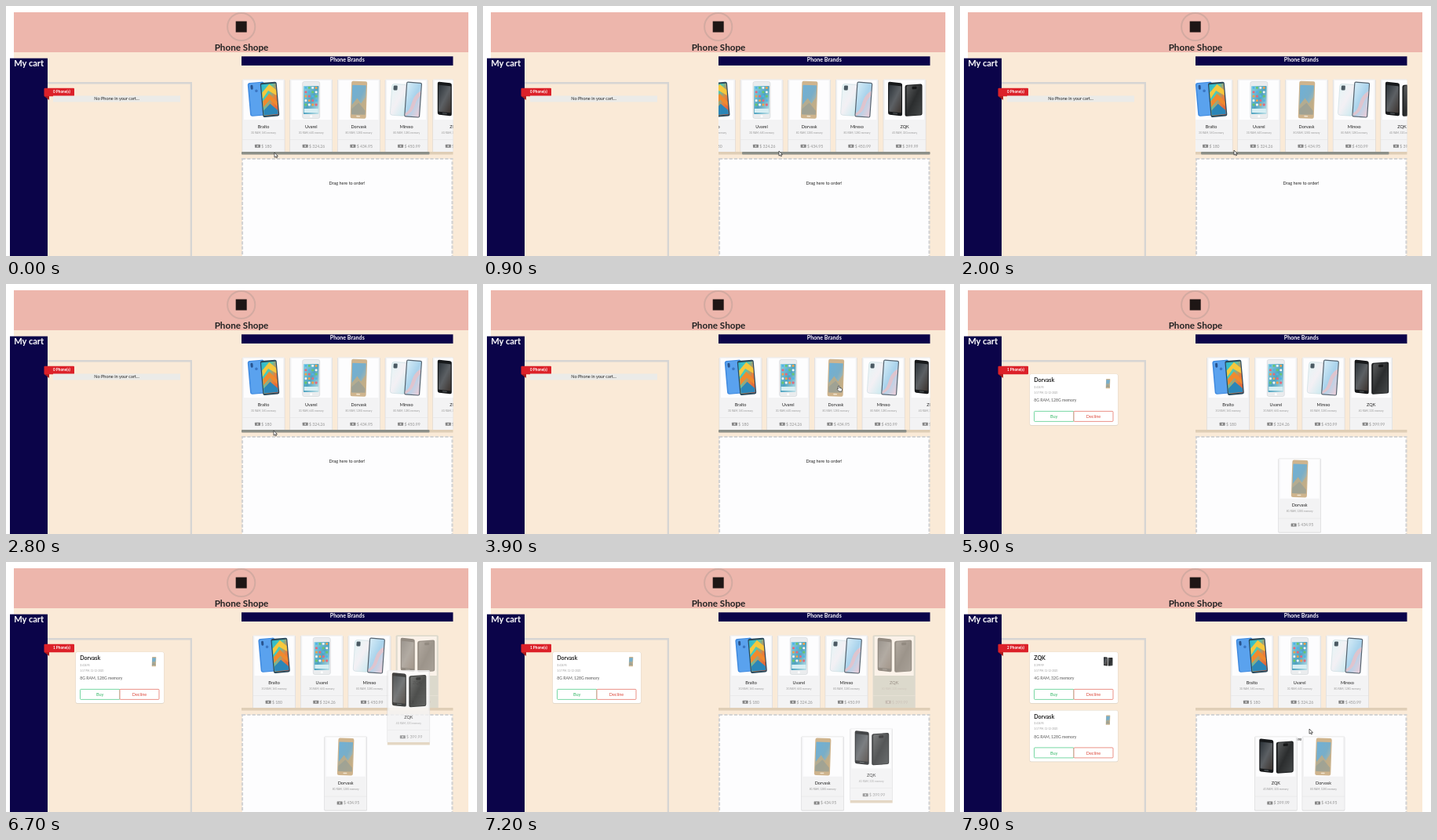
Write an HTML page that moves like this. It is 600 px wide and 319 px high and loops after 8 s.

```html
<!DOCTYPE html>
<html lang="en">
<head>
<meta charset="utf-8">
<title>Phone Shope</title>
<style>
html, body { margin: 0; width: 100%; height: 100%; overflow: hidden; background: #fff; }
svg { display: block; width: 600px; height: 319px; font-family: Lato, "Open Sans", sans-serif; }
.b { font-weight: 700; }
.m { text-anchor: middle; }
</style>
</head>
<body>
<svg id="stage" viewBox="0 0 600 319"></svg>
<script>
const STEP = 60.7, LOOP = 8000;
const phones = [
  { name: 'Bralto', spec: '3G RAM, 16G memory', price: '180' },
  { name: 'Uvarel', spec: '3G RAM, 64G memory', price: '324.26' },
  { name: 'Dorvask', spec: '8G RAM, 128G memory', price: '434.95' },
  { name: 'Mirexo', spec: '8G RAM, 128G memory', price: '450.99' },
  { name: 'ZQK', spec: '4G RAM, 32G memory', price: '399.99' }
];
// Pointer path: time, x, y
const path = [
  [0, 342, 187], [100, 343, 187], [800, 377, 185], [1200, 377, 185], [2000, 349, 184],
  [2300, 341, 186], [2800, 341, 187], [3700, 452, 130], [4000, 452, 130], [4900, 436, 262],
  [5200, 436, 262], [5900, 525, 122], [6400, 525, 122], [7200, 496, 240.5], [7400, 494, 246],
  [7900, 445, 213]
];
const drags = [{ id: 2, from: 4000, to: 4900 }, { id: 4, from: 6400, to: 7400 }];

const rect = (x, y, w, h, fill, more = '') =>
  `<rect x="${x}" y="${y}" width="${w}" height="${h}" fill="${fill}" ${more}/>`;
const text = (x, y, size, fill, str, cls = '') =>
  `<text x="${x}" y="${y}" font-size="${size}" fill="${fill}" class="${cls}">${str}</text>`;
const at = (x, y, body, more = '') => `<g transform="translate(${x} ${y})" ${more}>${body}</g>`;
const dot = (x, y, r, fill) => `<circle cx="${x}" cy="${y}" r="${r}" fill="${fill}"/>`;
const gradient = (id, colors) => `<linearGradient id="${id}" x2="1" y2="1">${
  colors.map((c, i) => `<stop offset="${i / (colors.length - 1)}" stop-color="${c}"/>`).join('')}</linearGradient>`;
const handset = (x, y, w, h, body, screen, edge = 3) =>
  rect(x, y, w, h, body, 'rx="2.2"') +
  rect(x + 1.2, y + edge, w - 2.4, h - 2 * edge, screen, 'rx=".7"');

const icons = () => {
  const colors = ['#4fb3e8', '#f0a04b', '#68c56c', '#e2677c', '#f4f4f4'];
  let out = '';
  for (let i = 0; i < 20; i++)
    out += rect(18.8 + i % 4 * 4.4, 9.5 + (i >> 2) * 5.4, 2.8, 2.8, colors[i * 7 % 5], 'rx=".7"');
  return out;
};
const art = [
  `<g transform="rotate(-5 27 26)">${rect(8.5, 3, 21, 43, '#3f8ae0', 'rx="3"')}
   ${rect(10, 4, 18, 41, '#5aa2ee', 'rx="2"')}${rect(12, 6, 3, 6, '#28548f', 'rx="1.5"')}
   ${dot(19, 14, 1.8, '#3b76c2')}${handset(24.5, 4.5, 21, 44, '#2b4a5c', 'url(#vivid)', 2)}
   <path d="M26 17L36 7L44 15V22L34 15L26 25Z" fill="#f6c83d"/>
   <path d="M26 28L35 19L44 30V36L35 27L26 36Z" fill="#f08a2e"/>
   <path d="M26 40L35 32L44 41V46H26Z" fill="#2b86b8"/></g>`,
  handset(16, 3, 22, 47, '#eaecee', 'url(#sea)', 5.5) + icons() +
    rect(18, 37.5, 18, 5, '#d6eef3') + dot(27, 47.2, 1.5, '#fff') +
    rect(16, 3, 22, 47, 'none', 'rx="2.2" stroke="#c9cdd1" stroke-width=".5"'),
  `<g transform="rotate(2 27 26)">${handset(17, 2.5, 20, 47.5, '#cfb48d', 'url(#sky)', 5)}
   <path d="M18.2 33L25 24L30 31L35.8 22V45H18.2Z" fill="#c9ab7c" opacity=".75"/>
   <path d="M18.2 38L27 30L35.8 40V45H18.2Z" fill="#8f9c9a" opacity=".6"/>
   ${rect(24.5, 46.4, 5, 1.6, '#f0e3cd', 'rx=".8"')}</g>`,
  `<g transform="rotate(4 27 26)">${rect(7.5, 7, 19, 40, 'url(#pearl)', 'rx="3" stroke="#bfd3d9" stroke-width=".5"')}
   ${rect(9.5, 9, 5, 6, '#4b5a63', 'rx="1.2"')}${handset(25.5, 3, 20, 45, '#55626e', 'url(#bloom)', 1.2)}
   <path d="M26.7 43C37 38 30 23 44.3 14V20C36 28 41 38 28 46.5H26.7Z" fill="#f1bfc4" opacity=".7"/></g>`,
  `<g transform="translate(6 3) skewY(6)">${handset(0, 0, 18, 42, '#17191b', 'url(#dusk)', 4)}
   ${rect(6, 39, 6, 1.4, '#4d5255', 'rx=".7"')}</g>
   <g transform="translate(27.5 7.5) skewY(-4)">${rect(0, 0, 22, 40, '#1d1f20', 'rx="2.2"')}
   ${rect(2, 1, 19, 38, 'url(#steel)', 'rx="1.8"')}${rect(9, 2.5, 6, 3.5, '#161718', 'rx="1"')}</g>`
];

function card(id, tone = '#f3f3f4') {
  const p = phones[id];
  return rect(-.3, .3, 54.6, 95, '#d4d4d5', 'rx="1.5"') +
    rect(.2, 0, 53.6, 94.4, tone, 'rx="1.2"') + rect(2, 1.5, 50, 50, '#fdfdfe') +
    `<use href="#p${id}"/>` +
    text(27, 62, 5.5, '#222', p.name, 'm') + text(27, 69, 3.2, '#999', p.spec, 'm') +
    rect(.2, 76.5, 53.6, .5, '#e0e0e1') +
    rect(16, 83.2, 7, 4, '#858585', 'rx=".5"') + dot(19.5, 85.2, 1, '#e4e4e5') +
    text(24.3, 87.1, 5.1, '#929292', '$ ' + p.price);
}

function cartItem(id, y) {
  const p = phones[id];
  return at(89, y,
    rect(-.4, -.2, 112.8, 66, '#dcd3c6', 'rx="2"') + rect(0, 0, 112, 65, '#fff', 'rx="1.8"') +
    at(92.5, 5.3, `<g transform="scale(.26)"><use href="#p${id}"/></g>`) +
    text(5.3, 10, 7, '#222', p.name, 'b') + text(5.5, 17.5, 3.1, '#999', '$ ' + p.price) +
    text(5.5, 24.5, 3.1, '#999', '3:17 PM, 12-12-2020') + text(5.3, 35, 5.1, '#555', p.spec) +
    rect(5.5, 47.4, 50.5, 13, '#fff', 'stroke="#3fc67d" stroke-width=".7" rx="1"') +
    rect(56, 47.4, 50, 13, '#fff', 'stroke="#e26355" stroke-width=".7" rx="1"') +
    text(30.7, 56, 5.6, '#35b768', 'Buy', 'm') + text(81, 56, 5.6, '#dd4b3e', 'Decline', 'm'));
}

const slot = (i, n) => Math.max(301, 436 - n * STEP / 2) + i * STEP;

function pointer(t) {
  const i = Math.max(1, path.findIndex(k => k[0] >= t));
  const [a, b] = [path[i - 1], path[i]];
  const f = (t - a[0]) / (b[0] - a[0]);
  return [a[1] + (b[1] - a[1]) * f, a[2] + (b[2] - a[2]) * f];
}

const arrow = '<path d="M0 0V6.2L1.5 5L2.5 7L3.5 6.5L2.6 4.6H4.4Z" fill="#fff" stroke="#222" stroke-width=".7"/>';
const hand = '<path d="M1 0Q2 0 2 1V2.5L5 3.2Q5.8 3.5 5.5 5L5 7H1.5L-1 4.2Q-.5 3.3 .3 4V1Q.3 0 1 0Z" fill="#fff" stroke="#222" stroke-width=".6"/>';

function scene(t) {
  const [cx, cy] = pointer(t);
  const ordered = drags.filter(d => t >= d.to).map(d => d.id).reverse();
  const list = phones.map((_, i) => i).filter(i => !ordered.includes(i));
  const drag = drags.find(d => t > d.from && t < d.to);
  const full = list.length === 5;
  const bar = full && t < 2800 ? Math.min(30, Math.max(0, cx - 342)) : 0;
  let out = '<g clip-path="url(#shelf)">' + list.map((id, i) => {
    const x = slot(i, list.length) - bar * 1.125;
    return drag && drag.id === id
      ? at(x, 93.5, card(id, '#b9c6bf'), 'opacity=".45"')
      : at(x, 93.5, card(id));
  }).join('') + '</g>';

  out += rect(300, 186, 269.5, 3.5, '#dfceb6');
  if (full) out += rect(300 + bar, 186, 239.5, 3.5, '#8d9089', 'rx="1"');

  out += ordered.map((id, i) => at(slot(i, ordered.length), 222.3, card(id))).join('');
  out += ordered.length
    ? ordered.map((id, i) => cartItem(id, 115 + i * 74.5)).join('')
    : rect(60, 114.5, 162, 8, '#ebebe8') + text(141, 120.3, 5.6, '#222', 'No Phone in your cart...', 'm');
  out += text(60, 111.3, 4.7, '#fff', ordered.length + ' Phone(s)', 'b');

  if (drag) {
    // The dragged copy carries the strip of shelf below the card
    const [gx, gy] = pointer(drag.from);
    const x = slot(list.indexOf(drag.id), list.length);
    out += at(x + cx - gx, 93.5 + cy - gy,
      `<g clip-path="url(#cut)">${card(drag.id)}</g>` + rect(0, 92, 54, 3.5, '#dfceb6'), 'opacity=".8"');
  } else if (t <= 4000 || ordered.length === drags.length) {
    out += at(cx, cy, t >= 3500 && t <= 4000 ? hand : arrow);
  }
  return out;
}

const navy = '#0b0449';
stage.innerHTML = '<defs>' +
  gradient('vivid', ['#2fb3cf', '#45cdbb', '#e9803a', '#d9533c']) +
  gradient('sea', ['#8fd3e4', '#4fa3c0', '#c4e4ea']) +
  gradient('sky', ['#6fb0d6', '#79aec8', '#cdbb95']) +
  gradient('pearl', ['#e4f5f6', '#f3f0f4', '#c9eaf0']) +
  gradient('bloom', ['#d6ecf7', '#a9d3ec', '#eccdd8']) +
  gradient('dusk', ['#2b3238', '#5c6064', '#3d342f']) +
  gradient('steel', ['#5a5c5d', '#2b2d2e', '#454849']) +
  art.map((a, i) => `<g id="p${i}">${a}</g>`).join('') +
  '<clipPath id="shelf"><rect x="300" y="90" width="269.5" height="96"/></clipPath>' +
  '<clipPath id="cut"><rect x="-1" y="-1" width="56" height="93"/></clipPath></defs>' +
  rect(10, 59, 579, 260, '#faead7') + rect(10, 8, 579, 51, '#edb6ac') +
  '<circle cx="299.7" cy="26.5" r="17.6" fill="none" stroke="#d3aaa1" stroke-width="2"/>' +
  rect(292.7, 19.5, 14, 14, '#1e1615') +
  text(300, 56.8, 11.7, '#222', 'Phone Shope', 'b m') +
  rect(5, 66.7, 48, 253, navy) + text(29.2, 76.9, 11.1, '#fff', 'My cart', 'b m') +
  rect(53, 97, 184, 2.5, '#d6d5d3') + rect(234.7, 97, 2.3, 222, '#d6d5d3') +
  rect(300, 64.3, 269.5, 11.6, navy) + text(434.8, 71.3, 7.1, '#fff', 'Phone Brands', 'b m') +
  rect(301, 195, 267.5, 140, '#fdfdfe', 'stroke="#d3d3d3" stroke-width="2.2" stroke-dasharray="4.2 2.1"') +
  text(434.5, 227.8, 5.5, '#222', 'Drag here to order!', 'm') +
  '<path d="M48.5 115H55V120Z" fill="#a91c1c"/>' + rect(48.5, 104.8, 38.5, 10.5, '#dc2129', 'rx="1"') +
  '<g id="live"></g>';

const live = document.getElementById('live');
const start = performance.now();
let shown = -1;
function tick() {
  const t = Math.floor((performance.now() - start) % LOOP / 100) * 100;
  if (t !== shown) live.innerHTML = scene(shown = t);
  requestAnimationFrame(tick);
}
tick();
</script>
</body>
</html>
```
